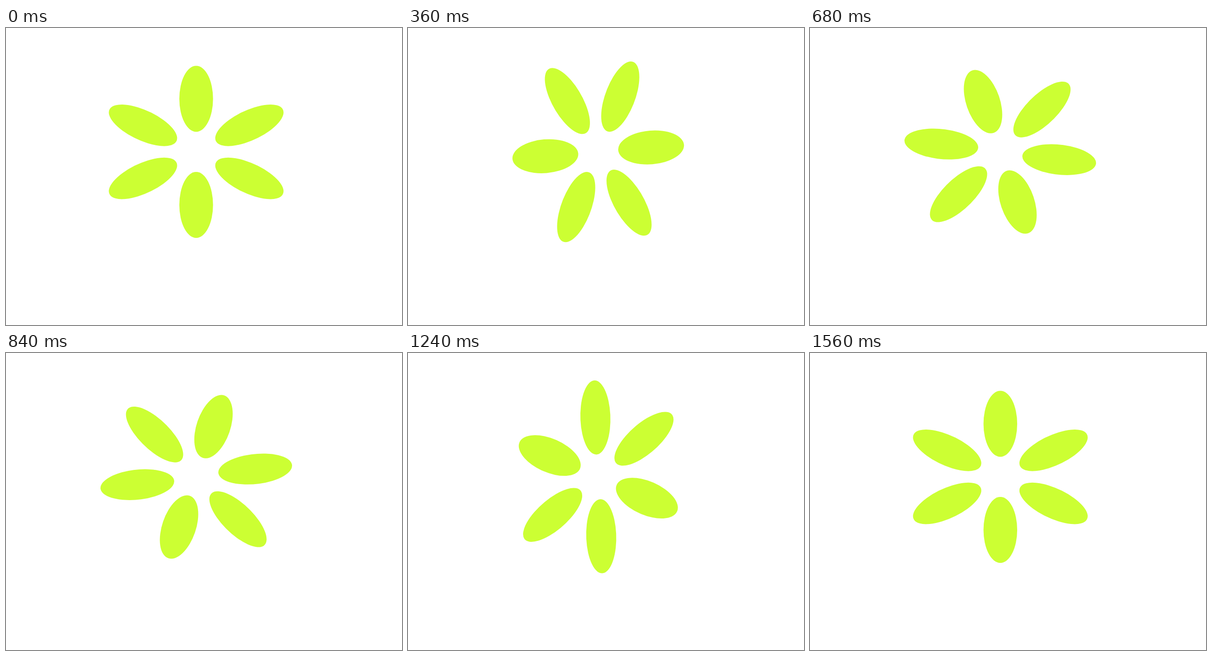
An HTML page that plays this animation: 864 px wide and 648 px high, repeating every 1600 ms.

```html
<!DOCTYPE html>
<html lang="en">
<head>
<meta charset="utf-8">
<title>Turning flower</title>
<style>
  html, body { margin: 0; width: 100%; height: 100%; overflow: hidden; background: #fff; }
  svg { display: block; width: 100%; height: 100%; }
</style>
</head>
<body>
<svg viewBox="0 0 864 648"><g id="flower" fill="#ccff33"></g></svg>
<script>
  const LOOP = 1600, STEP = 40, TURN_STEPS = 38, LAST_STEP = 39;
  const STRETCH = 1.158;
  const flower = document.getElementById('flower');

  for (let i = 0; i < 6; i++) {
    const petal = document.createElementNS('http://www.w3.org/2000/svg', 'ellipse');
    const attrs = { cy: -115.75, rx: 31.75, ry: 72, transform: `rotate(${i * 60})` };
    for (const name in attrs) petal.setAttribute(name, attrs[name]);
    flower.append(petal);
  }

  // One full turn in even steps, then a short rest before the loop restarts.
  function draw(ms) {
    const step = Math.floor((ms % LOOP) / STEP);
    const angle = 360 * Math.min(1, step / TURN_STEPS);
    const x = 414.95 + 0.35 * step / LAST_STEP;
    flower.setAttribute('transform',
      `translate(${x} 270.2) rotate(${angle}) scale(${STRETCH} 1)`);
  }

  const start = performance.now();
  function tick() {
    draw(performance.now() - start);
    requestAnimationFrame(tick);
  }
  draw(0);
  requestAnimationFrame(tick);
</script>
</body>
</html>
```
